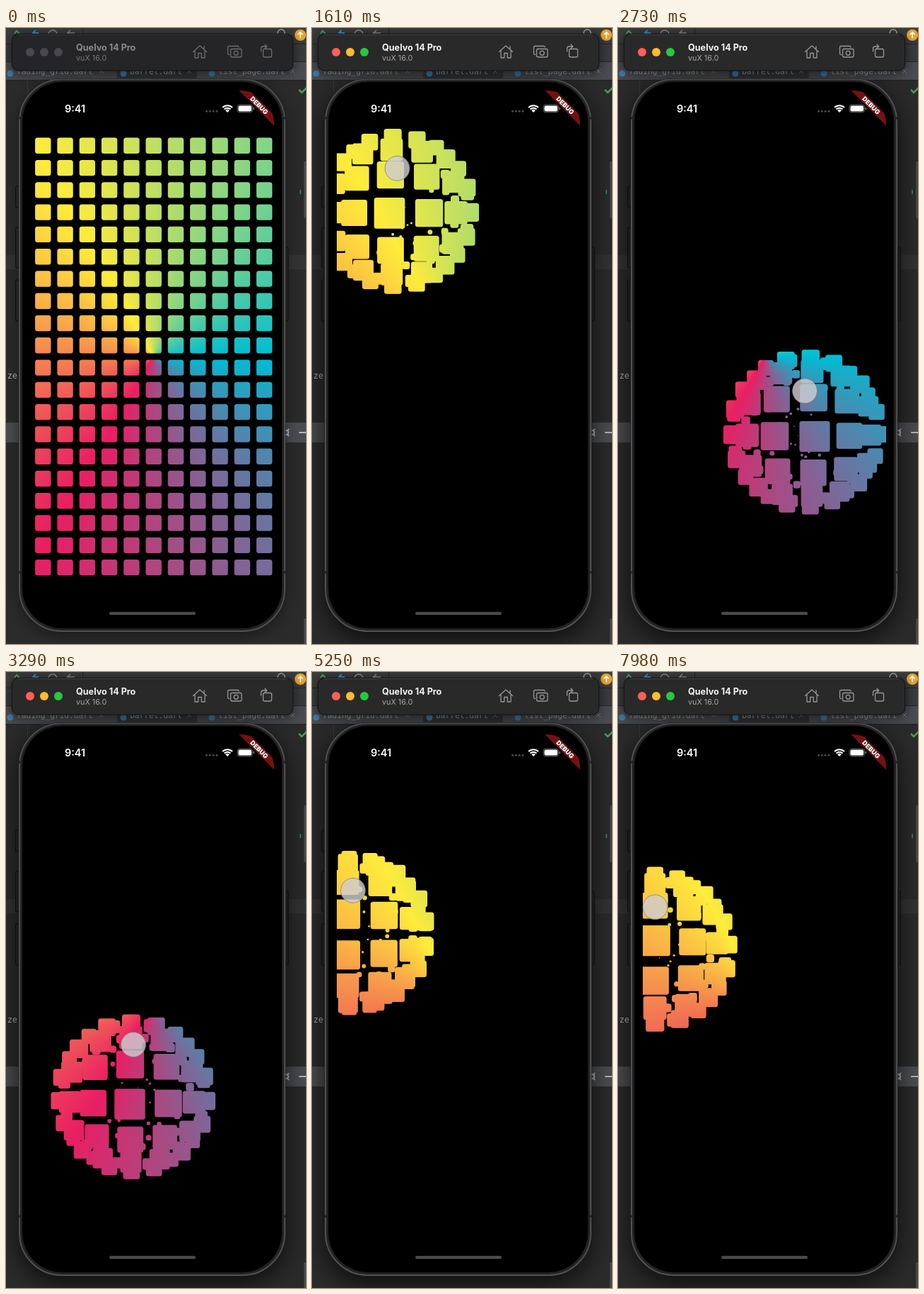
An HTML page with a canvas for the animation above (8000 ms loop, 424x868 px).

```html
<!DOCTYPE html>
<html lang="en">
<head>
<meta charset="utf-8">
<title>Lens grid</title>
<style>
html, body { margin: 0; width: 100%; height: 100%; overflow: hidden; background: #2b2b2b; }
canvas { display: block; }
</style>
</head>
<body>
<canvas id="stage" width="424" height="868"></canvas>
<script>
const W = 424, H = 868, LOOP = 8000, STEP = 70;
const FOCUS = 490, TOUCH = 560;
const COLS = 11, ROWS = 20, PITCH = 31.28, CELL = 22.4, REACH = 210.7;
const LEFT = 52.3, TOP = 165.8;
const SANS = 'Inter, "Open Sans", sans-serif';
const MONO = '"DejaVu Sans Mono", monospace';
const ctx = document.getElementById('stage').getContext('2d');

// time, lens centre x, y, distance of the finger above it
const path = [
  [490, 100, 270, 60], [900, 84, 262, 60], [1330, 96, 256, 60], [1610, 120.5, 258.3, 60.5],
  [1890, 192, 268, 60], [2100, 250, 316, 60], [2240, 257, 372.8, 60], [2520, 292, 485, 58],
  [2940, 224, 647, 58], [3010, 213, 649, 61], [3290, 180, 598, 73], [3570, 190, 460, 68],
  [3780, 198, 362, 63], [3990, 165, 335, 60], [4270, 101, 345.9, 60], [4620, 79, 359, 60],
  [5250, 58, 367.9, 60], [5460, 55, 374, 60], [6090, 48, 379, 60], [6500, 47, 377, 60],
  [7000, 48, 381, 60], [7560, 50, 400, 60], [7770, 52, 408.5, 60], [7980, 52.5, 391.3, 60]
];

function slope(i, k) {
  const a = path[Math.max(i - 1, 0)], b = path[Math.min(i + 1, path.length - 1)];
  return (b[k] - a[k]) / (b[0] - a[0]);
}

function along(t) {
  let i = 0;
  while (i < path.length - 2 && t >= path[i + 1][0]) i++;
  const a = path[i], b = path[i + 1], d = b[0] - a[0];
  const u = Math.min(1, Math.max(0, (t - a[0]) / d)), v = 1 - u;
  return [1, 2, 3].map(k =>
    v * v * (1 + 2 * u) * a[k] + u * v * v * d * slope(i, k) +
    u * u * (3 - 2 * u) * b[k] - u * u * v * d * slope(i + 1, k));
}

function box(g, x, y, w, h, r, fill, stroke, lw = 1) {
  g.beginPath();
  g.roundRect(x, y, w, h, r);
  if (fill) { g.fillStyle = fill; g.fill(); }
  if (stroke) { g.strokeStyle = stroke; g.lineWidth = lw; g.stroke(); }
}

function disc(g, x, y, r, fill, stroke) {
  g.beginPath();
  g.arc(x, y, r, 0, 7);
  if (fill) { g.fillStyle = fill; g.fill(); }
  if (stroke) { g.strokeStyle = stroke; g.stroke(); }
}

function text(g, s, x, y, font, fill, align = 'left') {
  g.font = font;
  g.fillStyle = fill;
  g.textAlign = align;
  g.fillText(s, x, y);
}

function line(g, d, color, lw = 1.3) {
  g.strokeStyle = color;
  g.lineWidth = lw;
  g.stroke(new Path2D(d));
}

function editor(g) {
  g.fillStyle = '#2b2b2b';
  g.fillRect(0, 0, W, H);
  g.fillStyle = '#3a3c3e';
  g.fillRect(0, 0, W, 48);
  g.fillStyle = '#4a4c50';
  g.fillRect(0, 48, W, 25);
  g.fillStyle = '#34363a';
  g.fillRect(157, 48, 113, 25);
  g.fillStyle = '#333';
  g.fillRect(0, 320, W, 20);
  g.fillStyle = '#4a4c4f';
  g.fillRect(0, 556, W, 28);
  line(g, 'M0 22.5H424M0 47.5H424M108.5 0V9M0 73.5H424', '#252627', 1);
  line(g, 'M30.5 74V110', '#3a3a3a', 1);

  line(g, 'M12 8l3-4 4 4', '#4f9f58', 2);
  line(g, 'M39 7h7m-4-4l-4 4 4 4', '#3b8fc0', 2);
  g.lineWidth = 1.5;
  disc(g, 66, 9, 6, null, '#8a8c8e');
  line(g, 'M97 7h-10l4-4m-4 4l4 4', '#8a8c8e', 1.5);
  g.lineWidth = 1.5;
  disc(g, 389, 7, 5, null, '#a0a2a4');
  disc(g, 416, 10, 8, '#eda42d');
  line(g, 'M416 14.5V6m-3.5 3.5L416 6l3.5 3.5', '#fff', 1.6);

  [['fading_grid.dart', 15, 135], ['barrel.dart', 175, 259], ['list_page.dart', 300, 405]]
    .forEach(([name, x, close]) => {
      disc(g, x - 9, 64, 4.5, '#3f7fae');
      text(g, name, x, 65, '11.2px ' + MONO, '#9fa2a5');
      line(g, `M${close - 3} 58l6 6m0-6l-6 6`, '#77797b', 1);
    });

  text(g, 'ze', 2, 494, '11.5px ' + MONO, '#a9b0b8');
  line(g, 'M414 87l4 4 7-7', '#4b9b59', 2.5);
  g.fillStyle = '#2d7a68';
  g.fillRect(415, 228, 2, 6);
  g.fillStyle = '#484848';
  g.fillRect(421, 188, 3, 80);
  g.fillRect(421, 832, 3, 36);
  g.lineWidth = 2;
  disc(g, 396, 570, 3, null, '#b0b3b6');
  line(g, 'M398 567l2-2m-2 8l2 2', '#b0b3b6', 1.8);
  line(g, 'M414 570h10', '#c0c2c4', 1.8);
}

function phone(g, active) {
  [[13.5, 223, 30], [13.5, 281, 57], [13.5, 355, 58], [394, 309, 103]].forEach(([x, y, h]) =>
    box(g, x, y, 5, h, 1.5, '#292929', '#111'));
  g.save();
  g.shadowColor = `rgba(0,0,0,${active ? 0.7 : 0.4})`;
  g.shadowBlur = active ? 34 : 20;
  g.shadowOffsetY = active ? 10 : 4;
  box(g, 17.5, 71, 378, 780.5, 61, '#161616');
  g.restore();
  box(g, 19, 72.5, 375, 777.5, 59.5, '#242424', '#505050', 2);
  box(g, 23, 76, 367, 770, 56, '#000', '#111');
  line(g, 'M18 127h4M391 127h4M18 767h4M391 767h4', '#222', 3);

  text(g, '9:41', 97.5, 118.7, '600 14.5px ' + SANS, '#fff', 'center');
  for (let i = 0; i < 4; i++) disc(g, 283.5 + i * 4.8, 117.3, 1.5, '#4b4b4b');
  const from = -Math.PI * 0.75, to = -Math.PI * 0.25;
  [9.8, 6.3].forEach(r => {
    g.beginPath();
    g.arc(313, 119, r, from, to);
    g.strokeStyle = '#fff';
    g.lineWidth = 2.1;
    g.stroke();
  });
  g.beginPath();
  g.moveTo(313, 119);
  g.arc(313, 119, 4, from, to);
  g.fillStyle = '#fff';
  g.fill();
  box(g, 327, 108.2, 21.5, 10.6, 3.3, null, '#777', 0.9);
  box(g, 328.4, 109.6, 18.7, 7.8, 2.2, '#fff');
  box(g, 349.5, 111.8, 1.4, 3.5, 0.7, '#777');
  box(g, 146, 822.8, 122, 4.2, 2.1, '#4b4b4b');
}

function banner(g) {
  g.save();
  box(g, 35, 88, 344, 746, 48);
  g.clip();
  g.translate(379, 88);
  g.rotate(Math.PI / 4);
  g.fillStyle = '#731212';
  g.fillRect(-35.1, 24.6, 70.2, 10.5);
  text(g, 'DEBUG', 0, 33.1, '900 9px ' + SANS, '#fff', 'center');
  g.restore();
}

function toolbar(g, active) {
  g.save();
  g.shadowColor = 'rgba(0,0,0,.6)';
  g.shadowBlur = 18;
  g.shadowOffsetY = 3;
  box(g, 8, 8, 398, 52.5, 9, active ? '#2a292a' : '#252527');
  g.restore();
  box(g, 8.5, 8.5, 397, 51.5, 9, null, '#121212');
  line(g, 'M17 9.5H397', active ? '#464546' : '#38383a', 1);
  const lights = active ? ['#ff5f57', '#febc2e', '#28c840'] : ['#48484d', '#48484d', '#48484d'];
  lights.forEach((c, i) => disc(g, 34 + 20 * i, 34, 6, c));
  text(g, 'Quelvo 14 Pro', 99, 32, '700 12.6px ' + SANS, active ? '#f4f4f4' : '#8b8b8d');
  text(g, 'vuX 16.0', 99, 46, '10.8px ' + SANS, active ? '#a5a5a5' : '#77777a');

  const ink = active ? '#979798' : '#6d6d70';
  g.lineJoin = g.lineCap = 'round';
  line(g, 'M264.5 33.5l9.5-8.5 9.5 8.5M267 32v10h4.7v-6.5h4.6V42h4.7V32M280 30v-4', ink);
  box(g, 317.5, 29.5, 15.5, 11.5, 2, null, ink, 1.3);
  g.lineWidth = 1.3;
  disc(g, 325.2, 35.3, 3, null, ink);
  line(g, 'M315.5 37.5h-.5q-1.5 0-1.5-1.5v-8.5q0-2 2-2h12q1.5 0 1.5 1.5', ink);
  box(g, 363.5, 29.5, 12, 11.5, 2, null, ink, 1.3);
  line(g, 'M360.5 33v-4q0-3 3-3h5m-2.5-2.7l2.7 2.7-2.7 2.7', ink);
}

function backdrop(active) {
  const c = document.createElement('canvas');
  c.width = W;
  c.height = H;
  const g = c.getContext('2d');
  editor(g);
  phone(g, active);
  toolbar(g, active);
  banner(g);
  return c;
}

const idle = backdrop(false), live = backdrop(true);

const sweep = ctx.createConicGradient(0, LEFT + PITCH * 5, TOP + PITCH * 9.5);
['#00bcd4', '#e91e63', '#ffeb3b', '#00bcd4'].forEach((c, i) => sweep.addColorStop(i / 3, c));

// Each cell is scaled about the lens centre; the factor falls off with distance.
function grid(lens) {
  ctx.save();
  ctx.beginPath();
  ctx.roundRect(35, 88, 344, 746, 48);
  ctx.clip();
  ctx.fillStyle = sweep;
  for (let j = 0; j < ROWS; j++) {
    for (let i = 0; i < COLS; i++) {
      let x = LEFT + PITCH * i, y = TOP + PITCH * j, s = 1;
      if (lens) {
        const dx = x - lens[0], dy = y - lens[1];
        s = 2 * (1 - Math.hypot(dx, dy) / REACH);
        if (s <= 0) continue;
        x = lens[0] + dx * s;
        y = lens[1] + dy * s;
      }
      const size = CELL * s;
      ctx.beginPath();
      ctx.roundRect(x - size / 2, y - size / 2, size, size, Math.min(3.5, size / 2));
      ctx.fill();
    }
  }
  ctx.restore();
}

function draw(now) {
  const t = Math.floor(now % LOOP / STEP) * STEP;
  const lens = along(t);
  ctx.drawImage(t < FOCUS ? idle : live, 0, 0);
  grid(t < TOUCH ? null : lens);
  if (t >= FOCUS) {
    ctx.lineWidth = 1;
    disc(ctx, lens[0], lens[1] - lens[2], 17.4, 'rgba(208,204,208,.82)', 'rgba(130,128,130,.8)');
  }
}

const start = performance.now();
function tick() {
  draw(performance.now() - start);
  requestAnimationFrame(tick);
}
tick();
</script>
</body>
</html>
```
